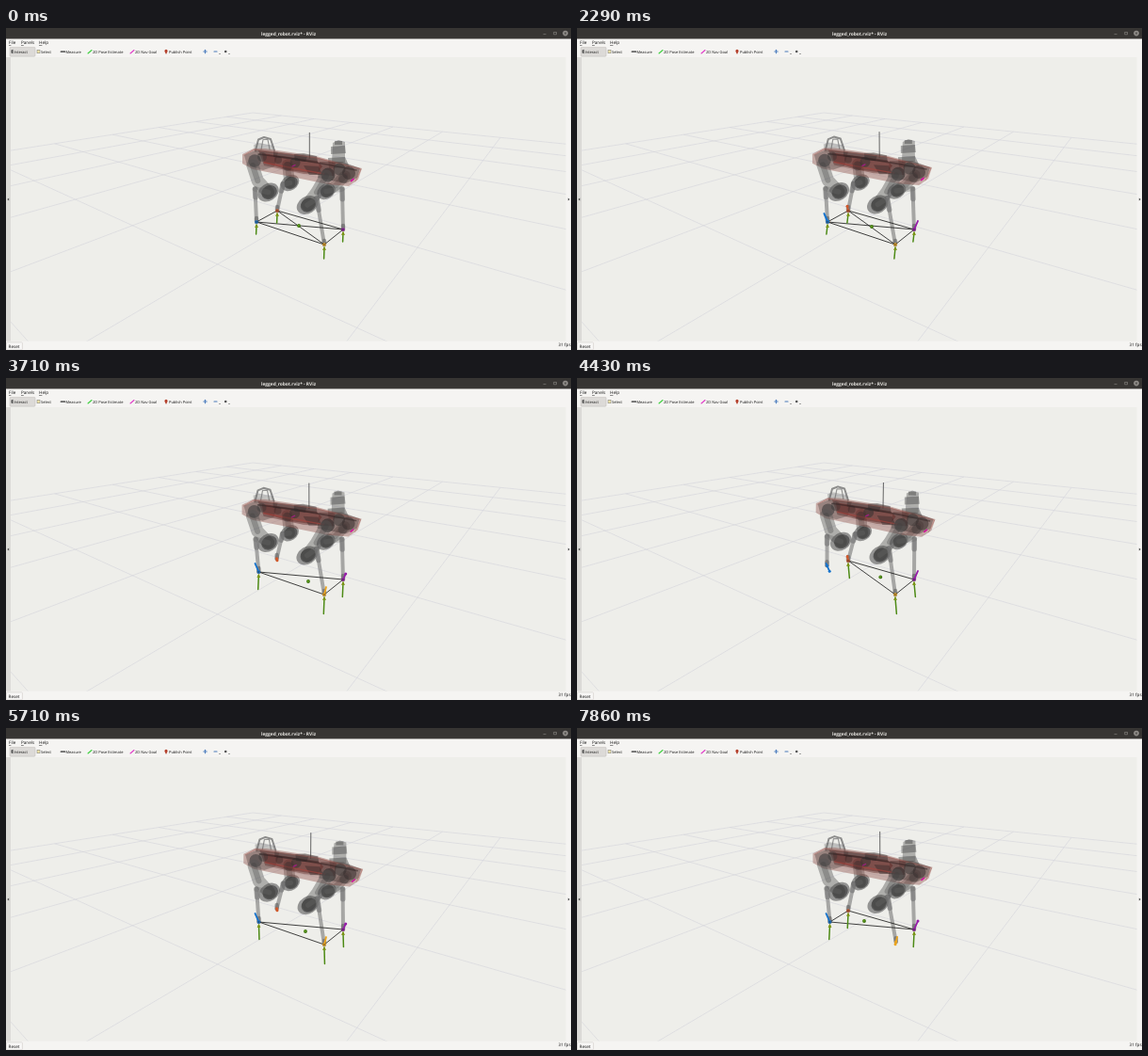
These frames come from a looping animation (600 px wide and 342 px high, 8 s). An HTML page:

```html
<!DOCTYPE html>
<html lang="en">
<head>
<meta charset="utf-8">
<title>Legged robot viewer</title>
<style>
html, body { margin: 0; width: 100%; height: 100%; overflow: hidden; background: #f5f4f2; }
svg { display: block; width: 100%; height: 100%; }
text { font-family: "Open Sans", "Noto Sans", sans-serif; font-size: 4px; fill: #111; text-rendering: geometricPrecision; }
.menu text { font-size: 4.6px; }
.menu tspan { text-decoration: underline; }
#tools text { font-weight: 500; }
#grid { stroke: #d3d3da; stroke-width: .6; fill: none; }
#support { stroke: #141414; stroke-width: .8; fill: none; stroke-linejoin: round; }
.r { fill: none; stroke-linecap: round; stroke-linejoin: round; }
</style>
</head>
<body>
<svg viewBox="0 0 600 342" preserveAspectRatio="none">
  <defs><clipPath id="view"><rect x="5" y="31" width="589.5" height="301.5"/></clipPath></defs>
  <rect width="600" height="342" fill="#f5f4f2"/>
  <rect width="600" height="11.5" fill="#373533"/>
  <text x="300" y="7.6" text-anchor="middle" style="font-size:4.85px;font-weight:700;fill:#e8e6e2">legged_robot.rviz* - RViz</text>
  <g stroke="#8d8a86" stroke-width=".6" fill="none">
    <path d="M570.5 6.6h3"/><rect x="581.8" y="4.3" width="2.6" height="2.6"/>
  </g>
  <circle cx="594" cy="5.6" r="2.8" fill="#8f8c88"/>
  <path d="M592.9 4.5l2.2 2.2m0-2.2l-2.2 2.2" stroke="#2e2c2a" stroke-width=".6"/>
  <g class="menu">
    <text x="3" y="17.2"><tspan>F</tspan>ile</text>
    <text x="16" y="17.2"><tspan>P</tspan>anels</text>
    <text x="35" y="17.2"><tspan>H</tspan>elp</text>
    <rect x=".4" y="333.8" width="17" height="8" rx="1" fill="#f8f7f6" stroke="#c6c3bf" stroke-width=".5"/>
    <text x="2.6" y="339.9">Reset</text>
    <text x="599.6" y="338.4" text-anchor="end">31 fps</text>
  </g>
  <rect x="4" y="20.4" width="27" height="9.8" rx="1" fill="#dcdad7" stroke="#bcb9b5" stroke-width=".5"/>
  <g id="tools"></g>
  <rect y="31" width="5" height="301.5" fill="#dbdad7"/>
  <rect x="5" y="31" width="589.5" height="301.5" fill="#eeeeea"/>
  <path d="M3.2 180.5v3l-2-1.5zM596.8 180.5v3l2-1.5z" fill="#555"/>
  <g clip-path="url(#view)">
    <path id="grid"/>
    <g id="far"></g>
    <g id="body"></g>
    <g id="near"></g>
    <path id="support"/>
    <g id="marks"></g>
  </g>
</svg>
<script>
const $ = id => document.getElementById(id);
const LOOP = 8000, STEP = 1000 / 7, SWING = 480, CYCLE = 2000, GAIT = 1800, HORIZON = 1200;

const line = (pts, color, w, op = 1) =>
  `<path class="r" d="M${pts.map(p => p[0].toFixed(2) + ' ' + p[1].toFixed(2)).join('L')}" stroke="${color}" stroke-width="${w}" opacity="${op}"/>`;
const shape = (d, fill, op = 1) => `<path d="${d}" fill="${fill}" opacity="${op}"/>`;
const disc = (x, y, r, fill, op = 1) => `<circle cx="${x.toFixed(2)}" cy="${y.toFixed(2)}" r="${r}" fill="${fill}" opacity="${op}"/>`;
const oval = (x, y, rx, ry, turn, fill, op) =>
  `<ellipse rx="${rx}" ry="${ry}" transform="translate(${x.toFixed(2)} ${y.toFixed(2)}) rotate(${turn})" fill="${fill}" opacity="${op}"/>`;

// Toolbar
const label = (x, s) => `<text x="${x}" y="26.7">${s}</text>`;
const arrowIcon = (x, c) => line([[x, 27], [x + 4, 23.5]], c, 1.1);
$('tools').innerHTML =
  label(8.5, 'Interact') + label(37, 'Select') + label(63.5, 'Measure') +
  label(92, '2D Pose Estimate') + label(137, '2D Nav Goal') + label(173, 'Publish Point') +
  shape('M5.5 23.5l2-.8v4.6l-2-.8z', '#555') +
  '<rect x="33" y="23.4" width="3" height="3.4" fill="#f1e6a8" stroke="#777" stroke-width=".5"/>' +
  line([[58.5, 25.2], [62.5, 25.2]], '#666', 1.7) +
  arrowIcon(87, '#3fd03f') + arrowIcon(132, '#e03cc8') +
  shape('M170 28l-1.5-3a1.6 1.6 0 1 1 3 0z', '#b5402c') +
  line([[209.8, 25], [213.2, 25]], '#4f7fc0', 1.1) + line([[211.5, 23.3], [211.5, 26.7]], '#4f7fc0', 1.1) +
  line([[221, 25], [224, 25]], '#4a78b8', 1.1) + shape('M226 27h2l-1 1z', '#555') +
  disc(233.2, 25, 1.3, '#555') + shape('M236 27h2l-1 1z', '#555');

// Ground plane, seen by a pitched camera; (i, j) count cells from the far corner
const CELL = .82;
const depth = (i, j) => .931 * (7.986 - CELL * (.587 * i + .81 * j)) + .365;
function ground(i, j) {
  const z = depth(i, j);
  return (300 + 363 * (-.8165 + CELL * (.81 * i - .587 * j)) / z).toFixed(1) + ' ' + (40 + 390 / z).toFixed(1);
}
function gridLine(n, swap) {
  const at = k => swap ? [k, n] : [n, k];
  const z0 = depth(...at(0)), z1 = depth(...at(10));
  if (z0 < .3) return '';
  const end = z1 < .3 ? 10 * (z0 - .3) / (z0 - z1) : 10;
  return 'M' + ground(...at(0)) + 'L' + ground(...at(end));
}
let gridPath = '';
for (let n = 0; n <= 10; n++) gridPath += gridLine(n, false) + gridLine(n, true);
$('grid').setAttribute('d', gridPath);

// Trunk
$('body').innerHTML =
  line([[265, 130], [268, 118.5], [274, 116], [281, 118], [285, 130]], '#6d6d6d', 2, .75) +
  line([[271, 129], [273, 118.5], [278, 118.5], [280, 129]], '#777', 1.2, .75) +
  shape('M263 124l6-2 15 3 2 8-22-1z', '#666', .32) +
  line([[322.3, 111.3], [322.3, 138]], '#555', .9) +
  shape('M347 122l6-3 7 2v22l-14 1z', '#666', .48) +
  shape('M345 126l15-1 1 8-16 1z', '#444', .42) +
  shape('M349 120h8v4h-8z', '#444', .45) +
  shape('M342 138l18-1 5 11-22 1z', '#444', .45) +
  shape('M251 134l12-6 12 0 54 8 26 7 23 6-4 12-10 7-22-2-44-9-36-7-11-6z', '#8a4a42', .4) +
  shape('M253 135l14-6 22 3-4 15-12 4-17-5z', '#453a38', .36) +
  shape('M333 142l24 0 19 7-3 10-12 6-30-6z', '#3c302e', .4) +
  shape('M268 130l60 7 22 6-2 14-32-2-42-9z', '#5a2824', .42) +
  shape('M272 133l58 8 6 6-6 8-30-4-26-8z', '#5c1c1a', .42) +
  shape('M284 131l24 3 12 2-2 6-34-5z', '#2c2626', .38) +
  shape('M306 134l10-1 14 3 1 7-24-2z', '#2c2828', .42) +
  shape('M316 146l16 1 4 9-14 0z', '#282424', .38) +
  line([[268, 134], [300, 138], [341, 145], [372, 151]], '#2c1c1c', 1.6, .5) +
  line([[274, 143], [306, 149], [338, 155]], '#a8443c', 1.4, .6) +
  line([[253, 135], [264, 129], [330, 138], [377, 150], [371, 163]], '#a86058', .7, .7) +
  disc(264, 141, 6.8, '#333', .52) + disc(272, 137, 5, '#333', .4) +
  disc(289, 140, 4, '#2a2222', .35) +
  disc(307, 143, 5.5, '#2e2e2e', .5) + disc(299, 147, 5, '#333', .35) +
  disc(342, 156, 7.4, '#2a2a2a', .58) + disc(354, 150, 6.5, '#2e2e2e', .48) +
  disc(364, 154, 7, '#332828', .5) + disc(358, 160, 5, '#333', .35) +
  line([[304, 147], [307, 145.5]], '#b01890', 1.3, .8) +
  line([[366.5, 162.5], [369, 160.5]], '#d0149c', 1.7);

// Feet in swing order; lift is the offset at mid swing
const legs = [
  { foot: [338, 230], hip: [340, 157], knee: [320, 188], top: [330, 181], lift: [2, -8], color: '#eda51c', near: 1 },
  { foot: [266, 206], hip: [262, 146], knee: [278.5, 174.5], top: [264.5, 171], lift: [-4, -9], color: '#1573cc', near: 1 },
  { foot: [358, 214], hip: [360, 157], knee: [340, 173.5], top: [357, 171], lift: [4, -9], color: '#961ca8' },
  { foot: [288, 194], hip: [299, 145], knee: [301.5, 164.5], top: [294, 166], lift: [-1, -5], color: '#d2582a' },
];

// time, body shift x, y, then the balance point x, y
const poses = [
  [0, 0, 0, 311, 210], [860, 0, 0, 311, 210], [1860, -.5, 0, 306, 206], [2290, -1, -.7, 313, 211],
  [2570, 1, 0, 324, 212], [3000, -1.5, -.7, 298, 209], [3710, -.4, .7, 321, 216], [3860, 0, 0, 306, 206],
  [4570, 2.8, 0, 324, 212], [5000, -1.6, -.8, 297, 209], [5710, 1.2, .2, 318, 216], [5860, .8, 0, 306, 206],
  [6570, 3, .3, 324, 212], [7000, -1, -.5, 297, 209], [7710, 0, -.3, 320, 215], [7860, -.5, -1, 305, 205],
  [8000, -.5, -1, 306, 206],
];
function poseAt(t) {
  const n = Math.max(1, poses.findIndex(p => p[0] > t));
  const a = poses[n - 1], b = poses[n];
  const u = (1 - Math.cos(Math.PI * (t - a[0]) / (b[0] - a[0]))) / 2;
  return a.slice(1).map((v, i) => v + (b[i + 1] - v) * u);
}

// Swing progress 0..1, or -1 while the foot stands
function swing(leg, t) {
  const since = t - GAIT - leg * 500;
  if (since < 0) return -1;
  const s = since % CYCLE / SWING;
  return s < 1 ? s : -1;
}
function footAt(leg, t) {
  const { foot, lift } = legs[leg], s = swing(leg, t), h = s < 0 ? 0 : Math.sin(Math.PI * s);
  const drift = leg === 1 ? 2.5 * Math.min(1, Math.max(0, (t - 2300) / 1500)) : 0;
  return [foot[0] + drift + lift[0] * h, foot[1] + lift[1] * h];
}

function drawLeg(leg, f, dx, dy) {
  const move = (p, k, m) => [p[0] + dx * k + (f[0] - leg.foot[0]) * m, p[1] + dy * k + (f[1] - leg.foot[1]) * m];
  const hip = move(leg.hip, 1, 0), knee = move(leg.knee, .7, .12), top = move(leg.top, .5, .4);
  const big = leg.near ? 1.2 : 1.05;
  const mid = [(hip[0] + knee[0]) / 2 - (leg.near && leg.hip[0] < 300 ? 3 : 0), (hip[1] + knee[1]) / 2 + 2];
  const low = [top[0] + (f[0] - top[0]) * .25, top[1] + (f[1] - top[1]) * .25];
  return line([hip, mid, knee], '#555', 11 * big, .42) +
    line([hip, mid], '#3c3c3c', 6, .3) +
    oval(...knee, 10 * big, 7.6 * big, -32, '#444', .52) +
    oval(knee[0] + 1, knee[1], 7.2 * big, 6 * big, -32, '#222', .5) +
    line([knee, top], '#666', 5.5, .32) +
    line([top, low], '#5c5c5c', 5.5, .5) +
    line([top, f], '#777', 4, .6) +
    line([[f[0], f[1] - 4], f], '#555', 4.4, .5);
}

function force(f, len, lean) {
  const tail = [f[0] + lean, f[1] + len], y = f[1] + 1.5;
  return line([[f[0], y + 2], tail], '#4c8a14', 1.5) +
    shape(`M${f[0]} ${y}l1.9 4.6h-3.8z`, '#7c9416');
}

function trail(leg, t) {
  let out = '', run = [];
  for (let s = t; s <= t + HORIZON; s += 20) {
    const on = swing(leg, s) >= 0;
    if (on) run.push(footAt(leg, s));
    if ((!on || s + 20 > t + HORIZON) && run.length) {
      out += line(run, legs[leg].color, 1.8) + disc(...run[run.length - 1], 1.5, legs[leg].color);
      run = [];
    }
  }
  return out;
}

function draw(t) {
  const [dx, dy, zx, zy] = poseAt(t);
  const feet = legs.map((_, i) => footAt(i, t));
  const down = legs.map((_, i) => swing(i, t) < 0);
  const standing = [0, 1, 3, 2].filter(i => down[i]);
  const len = standing.length === 4 ? 13 : 18.5;

  $('body').setAttribute('transform', `translate(${dx.toFixed(2)} ${dy.toFixed(2)}) rotate(${(dx * .35).toFixed(2)} 315 150)`);
  let far = '', near = '', marks = '', support = '';
  legs.forEach((leg, i) => {
    const part = drawLeg(leg, feet[i], dx, dy);
    if (leg.near) near += part; else far += part;
    if (down[i]) marks += force(feet[i], len + (i === 0 ? 2 : 0), dx * .7 - .4);
    if (t > 860) marks += trail(i, t);
    marks += disc(...feet[i], down[i] ? 1.8 : 1.6, leg.color);
    if (down[i]) marks += disc(...feet[i], .9, '#333', .6);
  });
  standing.forEach((a, n) => standing.slice(n + 1).forEach(b => {
    support += `M${feet[a]}L${feet[b]}`;
  }));
  marks += disc(zx, zy, 1.9, '#3d7410') + disc(zx - .3, zy - .3, 1, '#62a01c');
  $('far').innerHTML = far;
  $('near').innerHTML = near;
  $('marks').innerHTML = marks;
  $('support').setAttribute('d', support);
}

let last = -1;
function tick() {
  const step = Math.floor((performance.now() % LOOP + 6) / STEP) % 56;
  if (step !== last) draw(step * STEP);
  last = step;
  requestAnimationFrame(tick);
}
tick();
</script>
</body>
</html>
```
